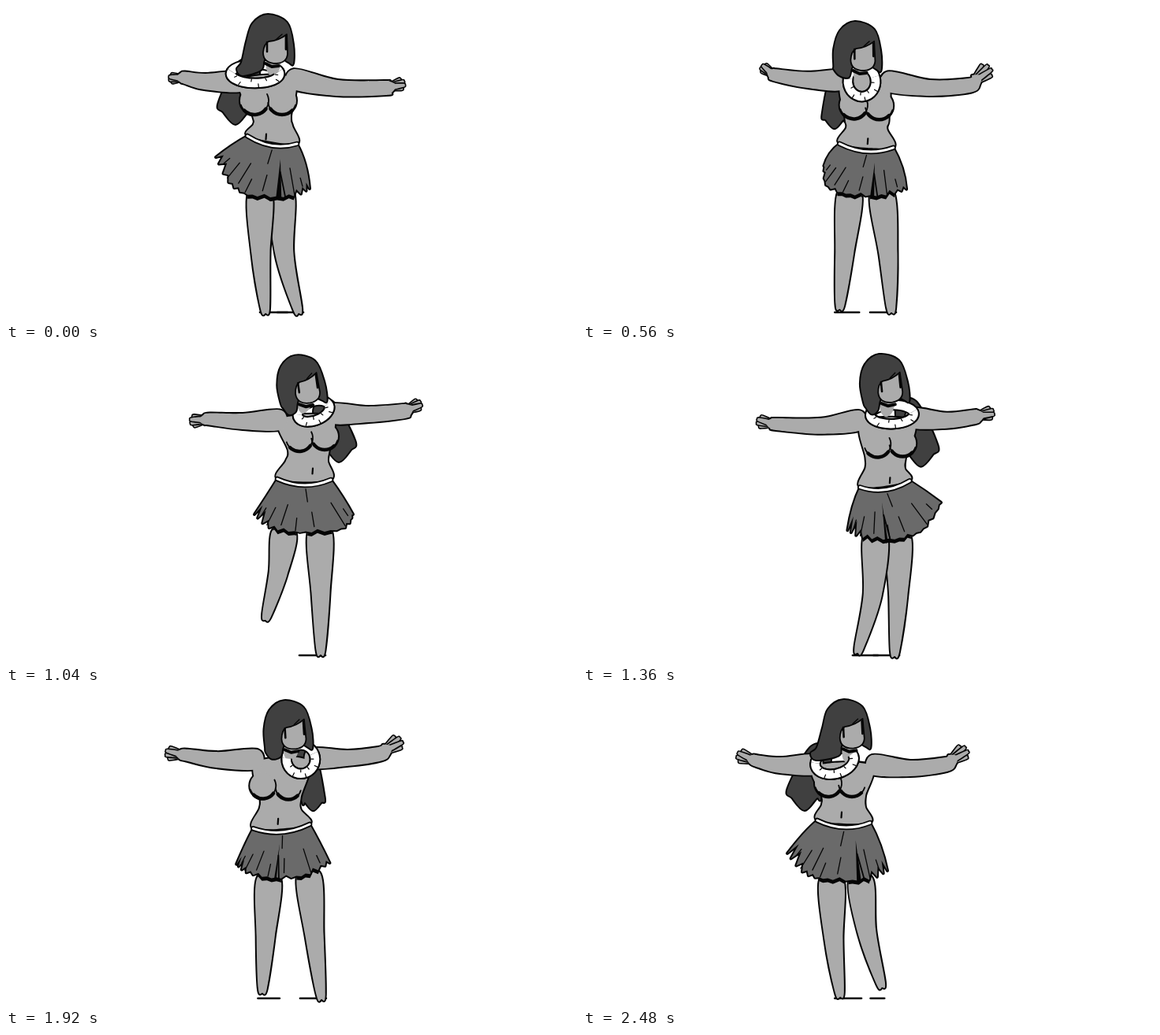
Animation of 724 by 400 pixels, one loop 2.56 s. Source, as an HTML page with a canvas:

```html
<!DOCTYPE html>
<html lang="en">
<head>
<meta charset="utf-8">
<title>Hula dancer</title>
<style>
html, body { margin: 0; width: 100%; height: 100%; overflow: hidden; background: #fff; }
canvas { display: block; width: 724px; height: 400px; }
</style>
</head>
<body>
<canvas id="stage" width="724" height="400"></canvas>
<script>
const ctx = document.getElementById('stage').getContext('2d');
const LOOP = 2560, STEP = 80, FLOOR = 389;
const INK = '#050505', SKIN = '#ababab', HAIR = '#404040', CLOTH = '#6a6a6a', WHITE = '#fff';

// Each part keeps its own list of keys, so a pose may set only some parts.
const tracks = {};
function pose(time, parts) {
  for (const name in parts) (tracks[name] ||= []).push({ time, v: parts[name] });
}

// head: x, y, tilt, lock tip; lei: centre, radii, tilt; tail: centre, radius
// bust: two centres, radius; trunk: left side down, right side up
pose(0, {
  head: [334, 45, 0, 300, 88], lei: [316, 86, 31, 12, 0], tail: [291, 128, 22],
  trunk: [297, 95, 313, 140, 314, 150, 363, 152, 361, 140, 364, 92],
  bust: [315, 120, 350, 120, 18], navel: [330, 166], belt: [306, 165, 369, 175],
  armL: [300, 96, 252, 96, 226, 91, 207, 92], armR: [362, 92, 420, 104, 482, 104, 505, 98],
  legL: [322, 238, 323, 315, 329, 390], legR: [350, 238, 353, 315, 371, 390],
  side: [286, 176, 382, 198], hem: [266, 192, 284, 226, 312, 241, 362, 242, 385, 232], slit: [.67, 5]
});
pose(320, {
  head: [334, 51, 0, 310, 88], lei: [343, 90, 20, 17, -.2], tail: [306, 134, 17],
  trunk: [310, 92, 320, 138, 320, 152, 370, 152, 370, 140, 368, 94],
  bust: [322, 121, 354, 123, 17], navel: [342, 167], belt: [314, 174, 378, 174],
  armL: [312, 91, 262, 88, 232, 74, 219, 55], armR: [370, 98, 425, 106, 472, 103, 492, 74],
  legL: [332, 236, 330, 310, 326, 387], legR: [356, 236, 372, 295, 380, 356],
  side: [303, 180, 393, 198], hem: [289, 203, 297, 225, 325, 237, 366, 237, 401, 228], slit: [.66, 3]
});
pose(400, { legR: [361, 236, 375, 292, 384, 352] });
pose(560, { legR: [379, 238, 387, 315, 391, 389] });
pose(720, {
  head: [359, 55, -.03, 337, 88], lei: [361, 98, 17, 20, 0], tail: [332, 142, 15],
  trunk: [339, 97, 342, 145, 344, 155, 396, 158, 399, 144, 397, 92],
  bust: [358, 128, 391, 128, 18], navel: [374, 174], belt: [333, 175, 403, 183],
  armL: [340, 96, 295, 97, 250, 95, 230, 90], armR: [395, 92, 450, 101, 502, 98, 528, 81],
  legL: [343, 238, 333, 315, 325, 384], legR: [392, 238, 396, 315, 396, 388],
  side: [316, 187, 417, 208], hem: [312, 203, 318, 231, 350, 241, 396, 243, 417, 235], slit: [.67, 4]
});
pose(880, { legL: [350, 235, 337, 310, 322, 389] });
pose(1040, {
  head: [373, 42, -.14, 359, 83], lei: [390, 79, 21, 12, -.35], tail: [422, 122, 21],
  trunk: [347, 90, 358, 129, 355, 142, 408, 142, 410, 126, 413, 86],
  bust: [372, 113, 404, 111, 17], navel: [389, 155], belt: [344, 165, 412, 166],
  armL: [350, 90, 300, 92, 258, 89, 234, 92], armR: [412, 82, 460, 83, 505, 79, 526, 69],
  legL: [353, 232, 345, 285, 329, 344], legR: [398, 232, 399, 310, 399, 388],
  side: [331, 186, 428, 188], hem: [315, 210, 336, 228, 380, 233, 428, 228, 440, 210], slit: [.66, 0]
});
pose(1200, { legL: [369, 236, 363, 305, 344, 375] });
pose(1280, {
  head: [381, 40, -.1, 367, 82], lei: [392, 82, 28, 12, 0], tail: [430, 126, 22],
  trunk: [355, 92, 360, 138, 360, 150, 409, 150, 410, 138, 420, 92],
  bust: [375, 119, 407, 118, 17], navel: [391, 165], belt: [353, 174, 415, 166],
  armL: [354, 90, 303, 98, 245, 96, 221, 92], armR: [415, 87, 462, 91, 498, 87, 521, 82],
  legL: [373, 238, 370, 315, 352, 390], legR: [401, 238, 400, 315, 395, 390],
  side: [342, 198, 436, 178], hem: [338, 231, 361, 241, 406, 241, 437, 226, 456, 192], slit: [.4, 2]
});
pose(1680, {
  head: [376, 47, -.1, 353, 86], lei: [390, 87, 23, 13, -.3], tail: [406, 131, 17],
  trunk: [335, 95, 338, 138, 338, 152, 392, 155, 394, 138, 405, 92],
  bust: [351, 125, 382, 124, 16], navel: [367, 171], belt: [329, 179, 403, 179],
  armL: [340, 92, 290, 94, 247, 88, 221, 87], armR: [408, 88, 450, 87, 485, 80, 518, 64],
  legL: [347, 236, 337, 290, 317, 349], legR: [393, 236, 395, 310, 397, 390],
  side: [320, 192, 412, 196], hem: [305, 222, 318, 234, 355, 240, 400, 236, 428, 220], slit: [.49, 3]
});
pose(2000, { legL: [329, 237, 327, 315, 327, 388] });
pose(2160, {
  head: [337, 43, -.03, 318, 83], lei: [348, 84, 15, 23, -.05], tail: [366, 139, 13],
  trunk: [301, 85, 310, 131, 309, 143, 360, 143, 359, 130, 366, 82],
  bust: [309, 113, 342, 116, 17], navel: [330, 157], belt: [302, 166, 369, 157],
  armL: [303, 79, 250, 80, 212, 75, 185, 70], armR: [365, 80, 420, 82, 465, 78, 485, 60],
  legL: [320, 232, 323, 310, 328, 388], legR: [373, 230, 386, 310, 402, 390],
  side: [292, 184, 386, 184], hem: [280, 215, 297, 228, 332, 234, 370, 228, 396, 214], slit: [.5, 1]
});
pose(2320, { legR: [366, 234, 379, 287, 394, 348] });
pose(2480, {
  head: [333, 44, -.05, 296, 86], lei: [319, 88, 25, 16, -.25], tail: [281, 128, 22],
  trunk: [293, 95, 303, 132, 303, 143, 358, 146, 358, 132, 365, 93],
  bust: [311, 116, 341, 116, 17], navel: [328, 156], belt: [297, 163, 364, 166],
  armL: [298, 92, 250, 93, 222, 88, 196, 80], armR: [365, 92, 415, 97, 460, 92, 486, 73],
  legL: [315, 238, 318, 315, 326, 387], legR: [352, 238, 360, 305, 379, 375],
  side: [281, 176, 379, 193], hem: [259, 205, 280, 230, 310, 238, 360, 239, 386, 227], slit: [.7, 4]
});

// Smooth periodic interpolation that never passes beyond its keys.
function valueAt(keys, t) {
  const n = keys.length;
  const key = j => keys[(j + n) % n];
  const when = j => key(j).time + LOOP * Math.floor(j / n);
  let i = n - 1;
  while (keys[i].time > t) i--;
  const span = when(i + 1) - when(i), u = (t - when(i)) / span;
  return keys[0].v.map((_, d) => {
    const rate = j => (key(j + 1).v[d] - key(j).v[d]) / (when(j + 1) - when(j));
    const slope = j => {
      const a = rate(j - 1), b = rate(j);
      return a * b > 0 ? 2 * a * b / (a + b) : 0;
    };
    const p = key(i).v[d], q = key(i + 1).v[d], e = u * u * (3 - 2 * u);
    return p + (q - p) * e + span * u * (1 - u) * ((1 - u) * slope(i) - u * slope(i + 1));
  });
}

const mix = (a, b, u) => [a[0] + (b[0] - a[0]) * u, a[1] + (b[1] - a[1]) * u];
const pairs = list => list.flatMap((x, i) => i % 2 ? [] : [[x, list[i + 1]]]);
const dist = (a, b) => Math.hypot(a[0] - b[0], a[1] - b[1]);

function blob(pts) {
  const path = new Path2D(), n = pts.length, at = i => pts[(i + n) % n];
  path.moveTo(...pts[0]);
  for (let i = 0; i < n; i++) {
    const [a, b, c, d] = [at(i - 1), at(i), at(i + 1), at(i + 2)];
    path.bezierCurveTo(b[0] + (c[0] - a[0]) / 6, b[1] + (c[1] - a[1]) / 6,
      c[0] - (d[0] - b[0]) / 6, c[1] - (d[1] - b[1]) / 6, c[0], c[1]);
  }
  path.closePath();
  return path;
}

// Tapered limb along a centre line, rounded at its last point.
function tube(pts, widths) {
  const left = [], right = [], last = pts.length - 1;
  pts.forEach((p, i) => {
    const a = pts[Math.max(0, i - 1)], b = pts[Math.min(last, i + 1)], len = dist(a, b) || 1;
    const dx = (b[0] - a[0]) / len, dy = (b[1] - a[1]) / len, w = widths[i];
    const c = i === last ? [p[0] - dx * w, p[1] - dy * w] : p;
    left.push([c[0] + dy * w, c[1] - dx * w]);
    right.unshift([c[0] - dy * w, c[1] + dx * w]);
  });
  return blob([...left, pts[last], ...right]);
}

function along(pts, s) {
  const x = s * (pts.length - 1), i = Math.min(pts.length - 2, Math.floor(x)), u = x - i;
  const at = j => pts[Math.max(0, Math.min(pts.length - 1, j))];
  const [a, b, c, d] = [at(i - 1), at(i), at(i + 1), at(i + 2)];
  return [0, 1].map(k => b[k] + u / 2 * (c[k] - a[k] + u * (2 * a[k] - 5 * b[k] + 4 * c[k] - d[k]
    + u * (3 * (b[k] - c[k]) + d[k] - a[k]))));
}

function stroke(path, width, color = INK) {
  ctx.lineWidth = width;
  ctx.strokeStyle = color;
  ctx.stroke(path);
}
function fill(path, color) {
  ctx.fillStyle = color;
  ctx.fill(path);
}
function shape(path, color) {
  stroke(path, 4);
  fill(path, color);
}
function line(pts, width, color) {
  const path = new Path2D();
  pts.forEach(p => path.lineTo(...p));
  stroke(path, width, color);
}

function arm(list, w) {
  const [a, b, c, tip] = pairs(list), palm = mix(c, tip, .55), len = dist(c, tip);
  const turn = Math.atan2(tip[1] - c[1], tip[0] - c[0]);
  const base = mix(c, tip, .2);
  const fingers = [-1.5, 1.5, -.5, .5].map(k => {
    const r = len * (.86 - .1 * Math.abs(k)), g = turn + k * .26;
    return tube([base, [base[0] + r * Math.cos(g), base[1] + r * Math.sin(g)]], [3, 2]);
  });
  return { body: tube([a, b, c, palm], [12, 10, w, w - 1.5]), fingers };
}

function drawSkirt(p, legs) {
  const hem = pairs(p.hem), [a, b] = pairs(p.belt), [ml, mr] = pairs(p.side);
  const sag = [(a[0] + b[0]) / 2, (a[1] + b[1]) / 2 + 15];
  const waist = s => mix(mix(a, sag, s), mix(sag, b, s), s);
  const swingL = Math.max(0, dist(a, hem[0]) - 40), swingR = Math.max(0, dist(b, hem[4]) - 52);
  const skirt = new Path2D(), N = 26;
  skirt.moveTo(...a);
  skirt.quadraticCurveTo(...ml, ...hem[0]);
  for (let i = 1; i < N; i++) {
    const s = i / N, q = along(hem, s);
    const fling = swingL * Math.max(0, 1 - s * 3) + swingR * Math.max(0, s * 3 - 2);
    const notch = i % 2 ? (i % 3 ? 1.5 : 4) + fling * 1.2 : 0;
    skirt.lineTo(...mix(q, waist(s), notch / dist(q, waist(s))));
  }
  skirt.lineTo(...hem[4]);
  skirt.quadraticCurveTo(...mr, ...b);
  skirt.quadraticCurveTo(...sag, ...a);

  for (const leg of legs) {
    ctx.save();
    ctx.clip(leg);
    ctx.translate(0, 5);
    fill(skirt, INK);
    ctx.restore();
  }
  shape(skirt, CLOTH);

  [.1, .2, .32, .43, .56, .78, .89].forEach((s, i) => {
    const q = along(hem, s), w = waist(s), low = i % 2 ? .03 : .12;
    line([mix(q, w, low), mix(q, w, .3 + .13 * (i % 3))], 1.3);
  });
  line([mix(waist(.52), along(hem, .54), .08), mix(waist(.52), along(hem, .54), .35)], 1.3);
  const [s, w] = p.slit, foot = along(hem, s), top = mix(foot, waist(s), .75);
  if (w > .3) {
    const cut = new Path2D();
    cut.moveTo(...top);
    cut.lineTo(foot[0] - w, foot[1] + 1);
    cut.lineTo(foot[0] + w * .4, foot[1] + 1);
    fill(cut, INK);
    line([mix(foot, waist(s), .5), [foot[0] + w + 2, foot[1]]], 1.8);
  }

  const belt = new Path2D();
  belt.moveTo(...a);
  belt.quadraticCurveTo(...sag, ...b);
  stroke(belt, 6.5);
  stroke(belt, 3, WHITE);
}

function drawBust([lx, ly, rx, ry, r]) {
  const arc = (x, y, from, to, w) => {
    const path = new Path2D();
    path.ellipse(x, y, r, r, 0, from * Math.PI, to * Math.PI);
    stroke(path, w);
  };
  arc(lx, ly, -.15, .9, 1.8);
  arc(rx, ry, .1, .95, 1.8);
  arc(lx, ly, .2, .75, 4.5);
  arc(rx, ry, .25, .8, 4.5);
}

function drawLei([x, y, rx, ry, turn], from, to) {
  const ring = new Path2D();
  ring.ellipse(x, y, rx, ry, turn, from, to);
  ctx.lineCap = 'butt';
  stroke(ring, 14.5);
  stroke(ring, 10.5, WHITE);
  ctx.lineCap = 'round';
  [.15, .6, 1.05, 1.45, 1.75, 2.2, 2.7].forEach((g, i) => {
    const spot = k => {
      const c = (rx + k) * Math.cos(g), s = (ry + k) * Math.sin(g);
      return [x + c * Math.cos(turn) - s * Math.sin(turn), y + c * Math.sin(turn) + s * Math.cos(turn)];
    };
    line(i % 2 ? [spot(5), spot(1)] : [spot(-5), spot(-2)], 1.2);
  });
}

function drawHead([x, y, tilt, tipX, tipY]) {
  const c = Math.cos(tilt), s = Math.sin(tilt), lock = [tipX, tipY];
  const at = (u, v) => [x + u * c - v * s, y + u * s + v * c];
  const edge = mix(at(-30, 10), lock, .5);
  shape(blob([at(-2, -34), at(-21, -23), at(-29, 0), [edge[0] - 3, edge[1]], [tipX - 7, tipY - 8],
    lock, at(-11, 36), at(-7, 24), at(2, 12), at(24, 26), at(30, 28), at(30, 4), at(22, -24)]), HAIR);
  line([at(-5, 28), at(3, 32), at(12, 31)], 4);
  const face = new Path2D();
  face.moveTo(...at(-8, 14));
  face.quadraticCurveTo(...at(-7, 3), ...at(-1, 0));
  face.quadraticCurveTo(...at(12, -1), ...at(22, -9));
  face.lineTo(...at(23, 16));
  face.quadraticCurveTo(...at(22, 27), ...at(9, 28));
  face.quadraticCurveTo(...at(-8, 28), ...at(-8, 14));
  fill(face, SKIN);
  stroke(face, 1.8);
  line([at(-3, 1), at(-3, 13)], 2.6);
  line([at(21, -6), at(21, 10)], 2.8);
  line([at(9, -3), at(16, -9)], 1.4);
}

function drawGround([x, y], back, ahead) {
  const k = Math.max(0, 1 - Math.max(0, FLOOR - 1 - y) / 28);
  if (k > 0) line([[x - back * k, FLOOR], [x + ahead * k, FLOOR]], 2.6);
}

function draw(t) {
  const p = {};
  for (const name in tracks) p[name] = valueAt(tracks[name], t);
  ctx.fillStyle = WHITE;
  ctx.fillRect(0, 0, 724, 400);
  ctx.lineCap = ctx.lineJoin = 'round';

  const [hx, hy] = p.head, [tx, ty, tr] = p.tail;
  const root = [hx + (tx - hx) * .6, hy + 30];
  shape(tube([root, [tx, ty], [tx, ty + tr]], [13, tr, tr * .7]), HAIR);

  const legL = pairs(p.legL), legR = pairs(p.legR);
  drawGround(legL[2], 7, 28);
  drawGround(legR[2], 27, 6);
  const legs = [legR, legL].map(leg => tube(leg, [15, 11.5, 5.5]));
  legs.forEach(leg => shape(leg, SKIN));

  const tk = pairs(p.trunk), [ba, bb] = pairs(p.belt), [lx, ly, rx, ry, r] = p.bust;
  const disc = (x, y) => {
    const path = new Path2D();
    path.arc(x, y, r, 0, 7);
    return path;
  };
  const trunk = blob([tk[0], tk[1], tk[2], [ba[0] + 1, ba[1]], [bb[0] - 1, bb[1]], tk[3], tk[4], tk[5]]);
  const arms = [arm(p.armL, 7.5), arm(p.armR, 9)];
  const parts = [trunk, disc(lx, ly), disc(rx, ry), ...arms.map(a => a.body)];
  parts.forEach(part => stroke(part, 4));
  arms.forEach(a => a.fingers.forEach(f => {
    stroke(f, 3.2);
    fill(f, SKIN);
  }));
  parts.forEach(part => fill(part, SKIN));
  drawBust(p.bust);
  const [nx, ny] = p.navel;
  line([[nx, ny - 3.5], [nx - .5, ny + 3.5]], 2.2);

  drawSkirt(p, legs);
  drawLei(p.lei, 0, Math.PI * 2);
  fill(tube([[hx + 6, hy + 20], [hx + 3, p.lei[1] + 3]], [8, 8]), SKIN);
  drawLei(p.lei, -.25, Math.PI + .25);
  drawHead(p.head);
}

const start = performance.now();
function tick() {
  const t = (performance.now() - start) % LOOP;
  draw(Math.floor(t / STEP) * STEP);
  requestAnimationFrame(tick);
}
tick();
</script>
</body>
</html>
```
